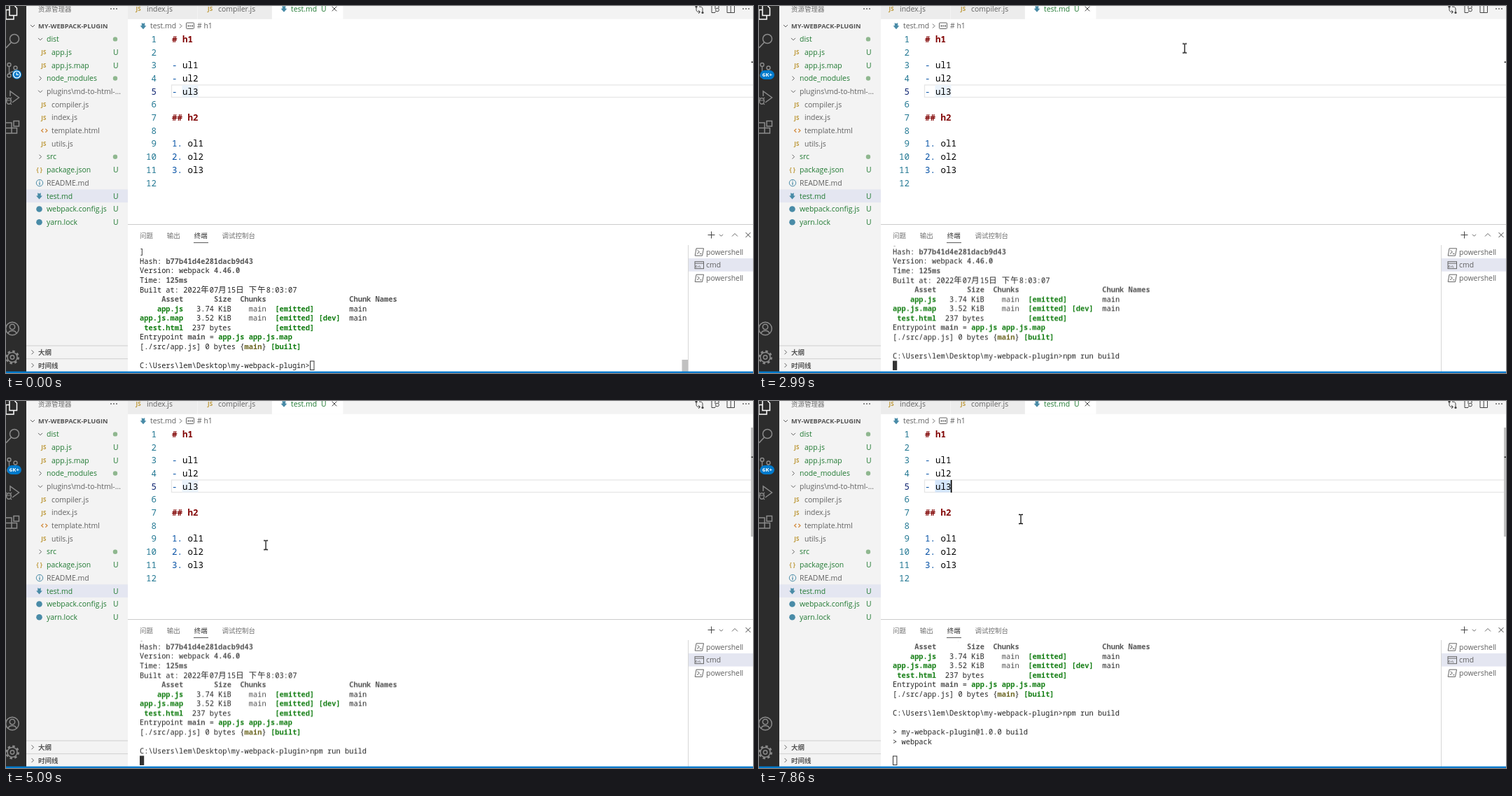
An HTML page for the animation above (8000 ms loop, 1067 by 525 pixels).

```html
<!DOCTYPE html>
<html lang="zh-CN">
<head>
<meta charset="utf-8">
<title>Editor and terminal</title>
<style>
  html, body { margin: 0; width: 100%; height: 100%; overflow: hidden; background: #fff; }
  svg { display: block; width: 1067px; height: 525px; }
  text { white-space: pre; }
  .ui { font: 10.45px "Open Sans", "Noto Sans CJK SC", "Noto Sans CJK", sans-serif; fill: #616161; }
  .cjk { font: 9.5px "Noto Sans CJK SC", "Noto Sans CJK", sans-serif; fill: #6f6f6f; }
  .strong { font-weight: 700; fill: #555; }
  .dark { fill: #333; }
  .head { font-size: 9.25px; }
  .git { fill: #217a33; }
  .js { font: 700 8px "Open Sans", sans-serif; fill: #be9a3c; }
  .code { font: 12.5px "Noto Sans Mono", monospace; fill: #000; }
  .num { fill: #237893; text-anchor: end; }
  .now { fill: #0b216f; }
  .title { fill: #800000; font-weight: 700; }
  .mark { fill: #0451a5; }
  .term { font: 10.39px "Noto Sans Mono", monospace; fill: #222; }
  .b { font-weight: 600; fill: #555; }
  .g { font-weight: 700; fill: #107c10; }
  .y { font-weight: 600; fill: #6b6520; }
  .m { fill: #505050; }
  .wide { font: 11.4px "Noto Sans CJK SC", "Noto Sans CJK", sans-serif; font-weight: 300; }
</style>
</head>
<body>
<script>
const LOOP = 8000;
const NS = 'http://www.w3.org/2000/svg';
const BLUE = '#007acc', ICON = '#498ba7', GREY = '#646464';

function add(parent, tag, attrs = {}, text) {
  const el = document.createElementNS(NS, tag);
  for (const key in attrs) el.setAttribute(key, attrs[key]);
  if (text !== undefined) el.textContent = text;
  parent.append(el);
  return el;
}
const svg = add(document.body, 'svg', { viewBox: '0 0 1067 525' });
const group = (parent = svg, attrs) => add(parent, 'g', attrs);
const rect = (x, y, width, height, fill, parent = svg) =>
  add(parent, 'rect', { x, y, width, height, fill });
const circle = (cx, cy, r, fill, parent = svg) => add(parent, 'circle', { cx, cy, r, fill });
const ring = (cx, cy, r, stroke, width = 1, parent = svg) =>
  add(parent, 'circle', { cx, cy, r, fill: 'none', stroke, 'stroke-width': width });
const line = (d, stroke = GREY, width = 1, parent = svg) =>
  add(parent, 'path', { d, stroke, fill: 'none', 'stroke-width': width });
const label = (x, y, text, cls = 'ui', parent = svg) =>
  add(parent, 'text', { x, y, class: cls }, text);

const chevron = (x, y, dir, parent = svg, size = 3) => line({
  down: `M${x - size} ${y - size / 2}l${size} ${size} ${size} ${-size}`,
  up: `M${x - size} ${y + size / 2}l${size} ${-size} ${size} ${size}`,
  right: `M${x - size / 2} ${y - size}l${size} ${size} ${-size} ${size}`
}[dir], GREY, 1, parent);
const cross = (x, y, r = 3.3) =>
  line(`M${x - r} ${y - r}l${2 * r} ${2 * r}m0 ${-2 * r}l${-2 * r} ${2 * r}`, '#444');
const arrow = (x, y) => add(svg, 'path', {
  d: `M${x - 2.2} ${y - 4.5}l2.2 1.2 2.2 -1.2v4.2h2.2l-4.4 5 -4.4 -5h2.2z`, fill: ICON
});
const dots = (x, y) => [-4, 0, 4].forEach(d => circle(x + d, y, 0.9, '#555'));

// Steps are [ms, value]; the last value is held to the end of the loop.
function animate(el, prop, steps, hard = true) {
  const easing = hard ? 'steps(1, end)' : 'linear';
  const all = [...steps, [LOOP, steps.at(-1)[1]]];
  el.animate(all.map(([t, v]) => ({ offset: t / LOOP, [prop]: v, easing })),
    { duration: LOOP, iterations: Infinity });
}
const show = (el, steps) => animate(el, 'opacity', steps);
const fade = (el, steps) => animate(el, 'opacity', steps, false);

function activityBar() {
  rect(0, 0, 29, 525, '#2c2c2c');
  const dim = '#8a8a8a';
  line('M5 0V13.5H15.5V3L12.5 0M5 5.5H0V19H11V14', '#fff', 1.5);
  ring(12, 47, 6.5, dim, 1.5);
  line('M7.5 52L0 60', dim, 1.6);
  line('M4.5 86.5V97M13.5 91C13.5 95 5 93 4.5 97', dim, 1.4);
  for (const [x, y] of [[4.5, 84], [13.5, 88.5], [4.5, 99.5]]) {
    circle(x, y, 2.5, '#2c2c2c');
    ring(x, y, 2.5, dim, 1.4);
  }
  line('M6 129V122L18.5 131 9 138', dim, 1.5);
  add(svg, 'ellipse', { cx: 4, cy: 136, rx: 3.3, ry: 4.2, fill: 'none', stroke: dim, 'stroke-width': 1.4 });
  line('M0 135H7.5M0 131l2 2M8 131l-2 2M8 141l-2 -2', dim, 1.2);
  line('M0 167H8V182H0M0 174.5H15.5V182H8M11 164.5H18.5V172H11Z', dim, 1.5);
  ring(9, 461.5, 9.3, dim, 1.5);
  ring(9, 459, 3.7, dim, 1.5);
  line('M3 468.5C4 463 14 463 15 468.5', dim, 1.5);
  ring(9, 502.5, 7, dim, 1.5);
  ring(9, 502.5, 8.7, dim, 2.6).setAttribute('stroke-dasharray', '3.4 3.43');
  ring(9, 502.5, 2.7, dim, 1.5);

  const clock = group();
  circle(15.5, 98, 6.8, BLUE, clock);
  ring(15.5, 98, 4.9, '#fff', 1.3, clock);
  line('M15.2 95V98.4H18', '#fff', 1.1, clock);
  const badge = group();
  add(badge, 'rect', { x: 1.5, y: 92, width: 20.5, height: 13, rx: 6.5, fill: BLUE });
  const count = label(11.8, 101.3, '6K+', 'ui', badge);
  count.setAttribute('style', 'font-size:7.8px;font-weight:700;fill:#fff;text-anchor:middle');
  show(clock, [[0, 1], [2510, 0]]);
  show(badge, [[0, 0], [2510, 1]]);
}

function sideBar() {
  rect(29, 0, 145, 523, '#f3f3f3');
  label(46, 7.8, '资源管理器', 'cjk');
  dots(154, 4);
  chevron(38, 28.5, 'down');
  label(46, 32, 'MY-WEBPACK-PLUGIN', 'ui strong head');
  rect(29, 262.4, 145, 18.7, '#e4e6f1');

  // name, icon, git state, nested
  const files = [
    ['dist', 'down', 'dot'], ['app.js', 'js', 'U', 1], ['app.js.map', 'js', 'U', 1],
    ['node_modules', 'right', 'dot'], ['plugins\\md-to-html-...', 'down'],
    ['compiler.js', 'js', '', 1], ['index.js', 'js', '', 1], ['template.html', 'tag', '', 1],
    ['utils.js', 'js', '', 1], ['src', 'right', 'dot'], ['package.json', 'json', 'U'],
    ['README.md', 'info'], ['test.md', 'arrow', 'U'], ['webpack.config.js', 'ball', 'U'],
    ['yarn.lock', 'ball', 'U']
  ];
  files.forEach(([name, icon, state, nested], i) => {
    const y = 47.4 + 18.7 * i;
    label(nested ? 65 : 58, y + 3.7, name, state ? 'ui git' : 'ui');
    if (state === 'U') label(153, y + 3.7, 'U', 'ui git');
    if (state === 'dot') circle(156, y, 3.2, '#8fb78f');
    if (icon === 'down' || icon === 'right') chevron(49, y, icon);
    if (icon === 'js') label(50.3, y + 3, 'JS', 'js');
    if (icon === 'tag') line(`M53.3 ${y - 2.5}l-2.7 2.5 2.7 2.5m3 -5l2.7 2.5 -2.7 2.5`, '#d28a3c', 1.2);
    if (icon === 'json') label(43.5, y + 2.8, '{ }', 'js');
    if (icon === 'arrow') arrow(47.5, y);
    if (icon === 'ball') circle(47.5, y, 4.3, ICON);
    if (icon === 'info') {
      ring(48, y, 4.7, ICON);
      line(`M48 ${y - 1}v3.8m0 -6v1.2`, ICON, 1.3);
    }
  });

  [['大纲', 495.3], ['时间线', 514]].forEach(([name, y]) => {
    line(`M29 ${y - 9.3}H174`, '#cfcfcf');
    chevron(38, y, 'right');
    label(46, y + 3.5, name, 'cjk strong');
  });
}

function tabs() {
  rect(174, 0, 893, 18.7, '#f3f3f3');
  rect(174, 0, 99, 18.7, '#ececec');
  rect(274, 0, 105.5, 18.7, '#ececec');
  rect(380, 0, 101.5, 18.7, '#fff');
  label(185.5, 7.2, 'JS', 'js');
  label(201, 8.2, 'index.js');
  label(288, 7.2, 'JS', 'js');
  label(303, 8.2, 'compiler.js');
  arrow(397, 4);
  label(407, 8.2, 'test.md', 'ui git');
  label(450, 8.2, 'U', 'ui git');
  cross(469, 4);

  line('M986 0V5.5C986 8 988 8.5 991 8.5M989 6l2.5 2.5 -2.5 2.5M995 9V4C995 1.5 993 1 990 1', '#444');
  circle(986, 1, 1.6, '#444');
  circle(995, 9.5, 1.6, '#444');
  line('M1008 0V9.5H1012M1013 0V4M1018 0V3', '#444');
  ring(1016, 5.5, 2.4, '#444');
  line('M1014 7.5l-2 2.5', '#444');
  line('M1030 0V9.5H1040.5V0M1035.2 0V9.5', '#444');
  dots(1057, 4);

  arrow(196, 28.6);
  label(206, 32.3, 'test.md');
  chevron(249.5, 28.6, 'right');
  add(svg, 'rect', { x: 257.5, y: 24, width: 11, height: 8.5, rx: 1, fill: 'none', stroke: GREY });
  line('M259.5 28.5h2m1 0h1.5m1 0h2', GREY, 2);
  label(273, 32.3, '# h1');
}

function editor() {
  const doc = ['# h1', '', '- ul1', '- ul2', '- ul3', '', '## h2', '', '1. ol1', '2. ol2', '3. ol3', ''];
  add(svg, 'rect', { x: 236.5, y: 113, width: 840, height: 17.5, fill: 'none', stroke: '#e6e6e6', 'stroke-width': 1.3 });
  const word = rect(251.5, 113, 23, 17.5, '#ebf3fb');
  animate(word, 'fill', [[0, '#ebf3fb'], [5450, '#d4e6fb']]);
  doc.forEach((text, i) => {
    const y = 51.8 + 18.7 * i;
    label(215, y, i + 1, i === 4 ? 'code num now' : 'code num');
    if (text.startsWith('#')) return label(237, y, text, 'code title');
    const [mark, item] = text.split(' ');
    if (!item) return;
    label(237, y, mark, 'code mark');
    label(237 + 7.5 * (mark.length + 1), y, item, 'code');
  });

  const folds = group();
  chevron(227.5, 47.7, 'down', folds, 3.6);
  chevron(227.5, 159.8, 'down', folds, 3.6);
  fade(folds, [[0, 0], [3640, 0], [4090, 1], [4540, 1], [4900, 0]]);

  const bar = rect(1064, 38, 3, 156, '#c1c1c1');
  fade(bar, [[0, 0], [2990, 0], [3140, 1]]);
  rect(1064.5, 79.5, 2.5, 1.6, '#333');

  const caret = rect(273.8, 113, 1.7, 18, '#000');
  show(caret, [[0, 0], [5450, 1], [6130, 0], [6640, 1], [7150, 0], [7650, 1]]);
}

function panel() {
  line('M174 312.5H1067', '#cccccc');
  [['问题', 191], ['输出', 229.7], ['终端', 268.7], ['调试控制台', 308.5]].forEach(([name, x]) =>
    label(x, 332, name, name === '终端' ? 'cjk dark' : 'cjk'));
  line('M268 338.6H289', '#555');
  line('M1002.5 327.5h10m-5 -5v10', '#444');
  chevron(1021.5, 328, 'down', svg, 2.5);
  chevron(1041, 327.5, 'up', svg, 4);
  cross(1060, 327.5, 3.5);

  rect(975, 361, 92, 18.7, '#e4e6f1');
  line('M974.5 342V523', '#d6d6d6');
  ['powershell', 'cmd', 'powershell'].forEach((name, i) => {
    const y = 352 + 18.7 * i;
    if (name === 'cmd') {
      add(svg, 'rect', { x: 984, y: y - 5, width: 12.5, height: 10, fill: 'none', stroke: GREY });
      line(`M984 ${y - 2.5}h12.5m-10 3.2h-1v2.5h1m2 -2v2m2 -2.5l1 3`, GREY, 0.9);
    } else {
      line(`M986 ${y - 5.2}h10.5l-2 10.4h-10.3z`, GREY);
      line(`M987.5 ${y - 2.7}l3 2.6 -3.6 2.6m4 0h2.6`, GREY);
    }
    label(1000, y + 3.7, name);
  });
}

function terminal() {
  const LEFT = 191, CELL = 6.234, ROW = 13.58;
  const asset = (col, name, size, sizeCol, chunk, dev) => [
    [col, name, 'g'], [sizeCol, size], [31, '[emitted]', 'g'],
    ...(chunk ? [[25, 'main', 'm'], [48, 'main']] : []), ...(dev ? [[41, '[dev]', 'g']] : [])
  ];
  // Each row is a list of [column, text, style].
  const rows = [
    [[0, ']']],
    [[0, 'Hash:'], [6, 'b77b41d4e281dacb9d43', 'b']],
    [[0, 'Version: webpack'], [17, '4.46.0', 'b']],
    [[0, 'Time:'], [6, '125ms', 'b']],
    [[0, 'Built at: 2022'], [14, '年', 'wide'], [16, '07'], [18, '月', 'wide'], [20, '15'],
      [22, '日', 'wide'], [25, '下', 'wide'], [27, '午', 'wide'], [29, '8:03:07']],
    [[5, 'Asset', 'b'], [17, 'Size', 'b'], [23, 'Chunks', 'b'], [48, 'Chunk Names', 'b']],
    asset(4, 'app.js', '3.74 KiB', 13, true),
    asset(0, 'app.js.map', '3.52 KiB', 13, true, true),
    asset(1, 'test.html', '237 bytes', 12),
    [[0, 'Entrypoint'], [11, 'main', 'b'], [16, '='], [18, 'app.js app.js.map', 'g']],
    [[0, '[./src/app.js] 0 bytes {'], [24, 'main', 'y'], [28, '}'], [30, '[built]', 'g']],
    [],
    [[0, 'C:\\Users\\lem\\Desktop\\my-webpack-plugin>'], [39, 'npm run build', 'typed']],
    [],
    [[0, '> my-webpack-plugin@1.0.0 build']],
    [[0, '> webpack']]
  ];

  const clip = add(svg, 'clipPath', { id: 'view' });
  rect(174, 343, 800, 179, '#000', clip);
  const view = group(svg, { 'clip-path': 'url(#view)' });
  const buffer = group(view);
  rows.forEach((row, i) => row.forEach(([col, text, style = '']) => {
    const el = label(LEFT + col * CELL, 355.2 + i * ROW, text, 'term ' + style, buffer);
    if (style === 'typed') show(el, [[0, 0], [1470, 1]]);
  }));
  const scroll = n => `translate(0px, ${-n * ROW}px)`;
  animate(buffer, 'transform', [[0, scroll(0)], [1840, scroll(1)], [7430, scroll(5)]]);

  const cursor = group();
  const hollow = add(cursor, 'rect', { x: 191.5, y: 508, width: 5.4, height: 12.6, fill: 'none', stroke: '#333' });
  const solid = rect(191, 507.5, 6.2, 13.5, '#333', cursor);
  const column = n => `translate(${n * CELL}px, 0px)`;
  animate(cursor, 'transform', [[0, column(39)], [1470, column(52)], [1840, column(0)]]);
  show(hollow, [[0, 1], [800, 0], [5450, 1]]);
  show(solid, [[0, 0], [800, 1], [5450, 0]]);

  const thumb = rect(965.5, 506, 8.5, 17, '#c1c1c1');
  fade(thumb, [[0, 1], [30, 1], [800, 0]]);
}

function pointer() {
  const beam = line('M-3 -6.5H-1L0 -5.8 1 -6.5H3M0 -6V6M-3 6.5H-1L0 5.8 1 6.5H3', '#111', 1.3);
  const path = [
    [0, 690, 515], [30, 690, 515], [130, 640, 500], [300, 580, 482], [550, 567, 484], [700, 567, 485],
    [2440, 567, 485], [2510, 572, 108], [2560, 758, 33], [2600, 758, 33],
    [2980, 620, 60], [3200, 380, 70], [3450, 241, 65], [3530, 241, 65], [3790, 200, 45],
    [4330, 200, 45], [4500, 467, 363], [4560, 467, 363], [4720, 470, 404], [5140, 358, 180],
    [5190, 352, 168], [5440, 290, 126], [5660, 282.5, 124], [5870, 282.5, 124],
    [5890, 284, 124], [6040, 285, 123], [6380, 279, 109], [6550, 278, 107],
    [6990, 278, 107], [7100, 305, 106], [7160, 305, 106], [7500, 355, 145],
    [7760, 373, 168], [7850, 374, 169]
  ];
  animate(beam, 'transform', path.map(([t, x, y]) => [t, `translate(${x}px, ${y}px)`]), false);
  show(beam, [[0, 0], [30, 1], [2600, 0], [2990, 1]]);
}

activityBar();
sideBar();
tabs();
editor();
panel();
terminal();
rect(0, 522.7, 1067, 2.3, BLUE);
pointer();
</script>
</body>
</html>
```
